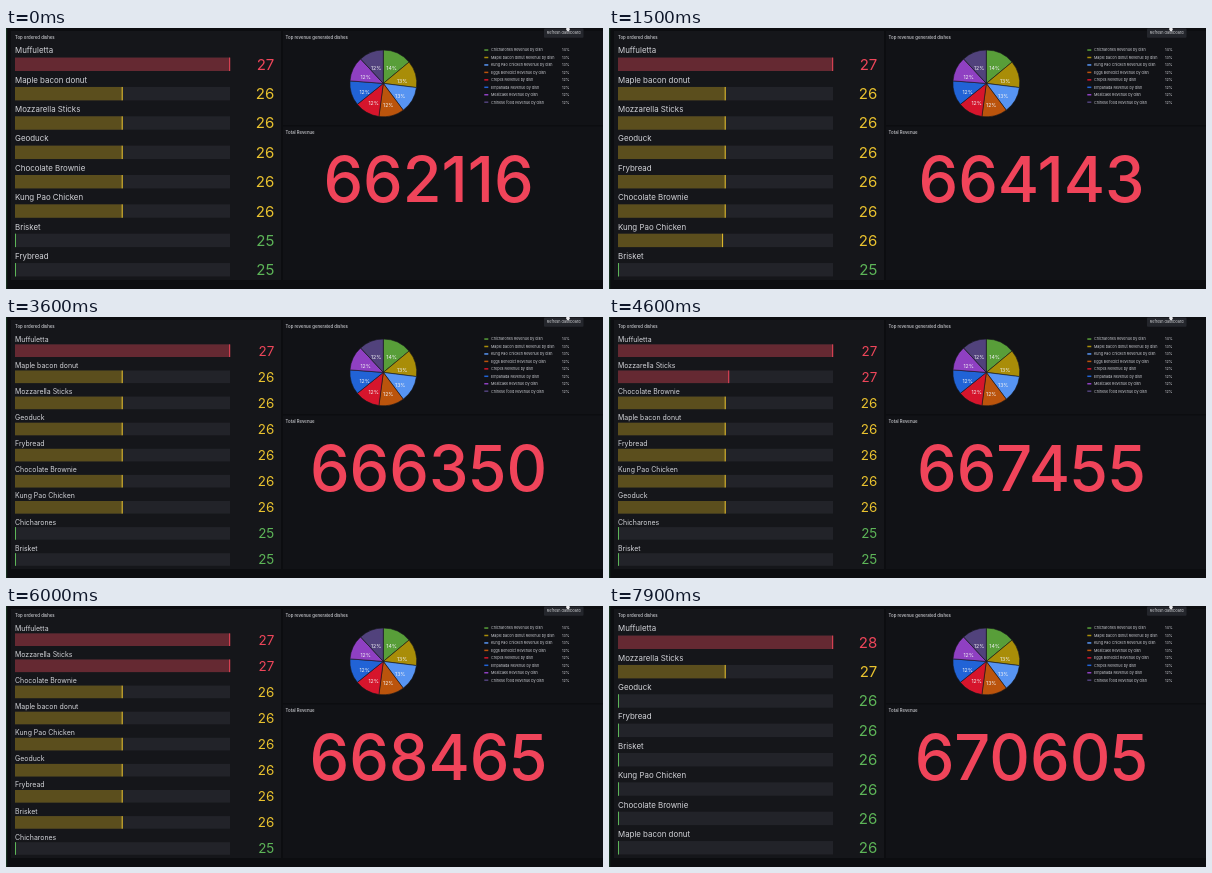
An HTML page for the animation above (8 s loop, 597 by 261 pixels).

```html
<!DOCTYPE html>
<html lang="en">
<head>
<meta charset="utf-8">
<title>Dish dashboard</title>
<style>
html, body { margin: 0; width: 100%; height: 100%; overflow: hidden; background: #0c0d10; }
svg { display: block; width: 597px; height: 261px; font-family: Inter, Roboto, sans-serif; }
</style>
</head>
<body>
<svg id="stage" viewBox="0 0 597 261"></svg>
<script>
const LOOP = 8000, STEP = 100, MOVE = 1000;
const LEFT = 9, TRACK = 215;
const FILL = ['#652932', '#5b4e1d', '#2b4a2c'];
const EDGE = ['#ee465a', '#e9c22f', '#5db558'];
const SLICES = ['#589e39', '#a98d08', '#5794f2', '#bb540c', '#d6152c', '#2163d6', '#8f40c2', '#51427c'];
const PARTS = [14, 13, 12.8, 12.3, 12.1, 12, 11.9, 11.9];

const dish = {
  mu: 'Muffuletta', ma: 'Maple bacon donut', mo: 'Mozzarella Sticks', ge: 'Geoduck',
  cb: 'Chocolate Brownie', kp: 'Kung Pao Chicken', br: 'Brisket', fr: 'Frybread',
  ch: 'Chicharones', eg: 'Eggs Benedict', cr: 'Crepes', em: 'Empanada',
  me: 'Meatcake', cf: 'Chinese food'
};

// Dishes are grouped by count: "highest|one less|two less".
const parseRows = groups => groups.split('|').flatMap((group, level) =>
  group.split(' ').map(id => ({ name: dish[id], level })));

// Every list below starts its entries with the time they take effect.
const ranks = [
  [0, 27, 'mu|ma mo ge cb kp|br fr'],
  [700, 27, 'mu|ma mo ge fr cb kp|br'],
  [2900, 27, 'mu|ma mo ge fr cb kp|ch br'],
  [3700, 27, 'mu|mo cb ma fr kp ge|ch br'],
  [4550, 27, 'mu mo|cb ma fr kp ge|ch br'],
  [5000, 27, 'mu mo|cb ma kp ge fr br|ch'],
  [6070, 28, 'mu|mo|ge fr br kp cb ma']
].map(([start, best, groups]) => [start, best, parseRows(groups)]);

const totals = [
  [0, 662116], [400, 663130], [1100, 664143], [2000, 665255], [2900, 666350],
  [4000, 667455], [5000, 668465], [6070, 669533], [7100, 670605]
];

const shares = [
  [0, 'ch ma kp eg cr em me cf', 3],
  [6070, 'ch ma kp eg me cr em cf', 3],
  [7100, 'ch ma kp me eg cr em cf', 4]
];

const latest = (list, t) => list.filter(([start]) => start <= t).pop();

// CSS "ease": cubic-bezier(.25, .1, .25, 1)
function ease(x) {
  if (x >= 1) return 1;
  if (x <= 0) return 0;
  const bez = (s, a, b) => 3 * s * (1 - s) ** 2 * a + 3 * s * s * (1 - s) * b + s ** 3;
  let lo = 0, hi = 1;
  for (let i = 0; i < 24; i++) {
    const mid = (lo + hi) / 2;
    if (bez(mid, .25, .25) < x) lo = mid; else hi = mid;
  }
  return bez(lo, .1, 1);
}

const reach = level => [TRACK, 107.5, 0.8][level];

// A bar keeps its slot and glides on from where it is when the goal changes.
function barWidth(slot, t) {
  let from = null, to = null, begin = 0;
  const widthAt = time => from + (to - from) * ease((time - begin) / MOVE);
  for (const [start, , rows] of ranks) {
    if (start > t) break;
    if (!rows[slot]) { to = null; continue; }
    const goal = reach(rows[slot].level);
    if (to === null) from = to = goal;
    else if (goal !== to) {
      from = widthAt(start);
      begin = start;
      to = goal;
    }
  }
  return widthAt(t);
}

const rect = (x, y, w, h, fill, more = '') =>
  `<rect x="${x}" y="${y}" width="${w}" height="${h}" fill="${fill}" ${more}/>`;
const text = (x, y, size, fill, body, more = '') =>
  `<text x="${x}" y="${y}" font-size="${size}" fill="${fill}" ${more}>${body}</text>`;

function drawBars(t) {
  const [, best, rows] = latest(ranks, t);
  const roomy = rows.length < 9;
  const pitch = roomy ? 29.35 : 26.1;
  const nameSize = roomy ? 7.9 : 6.95;
  const valueSize = roomy ? 15 : 13.4;
  return rows.map(({ name, level }, i) => {
    const y = (roomy ? 29.6 : 27.4) + i * pitch, h = roomy ? 13.4 : 12.6;
    const w = barWidth(i, t);
    return text(LEFT, y - (roomy ? 4.2 : 2.6), nameSize, '#d3d4d9', name)
      + rect(LEFT, y, TRACK, h, '#222329')
      + rect(LEFT, y, w, h, FILL[level])
      + rect(LEFT + w - .8, y, 1, h, EDGE[level])
      + text(268.3, y + h / 2 + valueSize * .365, valueSize, EDGE[level], best - level, 'text-anchor="end"');
  }).join('');
}

const percent = (i, bigger) => (i === 0 ? 14 : i < bigger ? 13 : 12) + '%';

function drawPie(bigger) {
  const cx = 377.3, cy = 55.4, r = 33.4, sum = PARTS.reduce((a, b) => a + b);
  const spot = (turn, len, dy = 0) => {
    const a = turn * 2 * Math.PI;
    return [cx + len * Math.sin(a), cy + dy - len * Math.cos(a)].map(n => n.toFixed(2));
  };
  let turn = 0, wedges = '', labels = '';
  PARTS.forEach((part, i) => {
    const end = turn + part / sum;
    wedges += `<path d="M${cx} ${cy}L${spot(turn, r)}A${r} ${r} 0 0 1 ${spot(end, r)}Z"
      fill="${SLICES[i]}" stroke="#17181c" stroke-width=".6"/>`;
    const [x, y] = spot((turn + end) / 2, 19.6, 4.6);
    labels += text(x, y, 5.2, '#f1f1f4', percent(i, bigger), 'text-anchor="middle"');
    turn = end;
  });
  return wedges + labels;
}

function drawLegend(order, bigger) {
  return order.split(' ').map((id, i) => {
    const y = 22.1 + i * 7.45;
    return rect(478.3, y - .8, 4, 1.5, SLICES[i])
      + text(485, y + 1.3, 3.7, '#c9cad0', dish[id] + ' Revenue by dish')
      + text(556, y + 1.3, 3.7, '#c9cad0', percent(i, bigger));
  }).join('');
}

const title = (x, y, body) => text(x, y, 4.3, '#cdced3', body, 'font-weight="500"');

const backdrop = rect(0, 0, 597, 261, '#0c0d10')
  + rect(0, 0, 1.2, 261, '#16301f')
  + rect(5, 3, 270, 249, '#15161a')
  + rect(277, 3, 320, 94, '#111216')
  + rect(277, 98.5, 320, 153.5, '#111216')
  + title(9, 11.2, 'Top ordered dishes')
  + title(279.6, 11.2, 'Top revenue generated dishes')
  + title(279.6, 106.2, 'Total Revenue');

const hint = rect(538, .5, 39.5, 9.3, '#24262c', 'rx="1"')
  + text(557.7, 6.4, 3.75, '#d5d6da', 'Refresh dashboard', 'text-anchor="middle"')
  + '<path d="M560.4 0h3l.5 1.6-1.2 1.6h-1.3l-1.3-1.8z" fill="#e9e9ec"/>';

const stage = document.getElementById('stage');
let shown = -1;

function render(t) {
  const [, order, bigger] = latest(shares, t);
  const [, total] = latest(totals, t);
  stage.innerHTML = backdrop + drawBars(t) + drawPie(bigger) + drawLegend(order, bigger)
    + text(422.5, 173.6, 63, '#f0445a', total, 'text-anchor="middle" font-weight="500"')
    + hint;
}

function tick() {
  const t = Math.floor(performance.now() % LOOP / STEP) * STEP;
  if (t !== shown) render(shown = t);
  requestAnimationFrame(tick);
}
tick();
</script>
</body>
</html>
```
